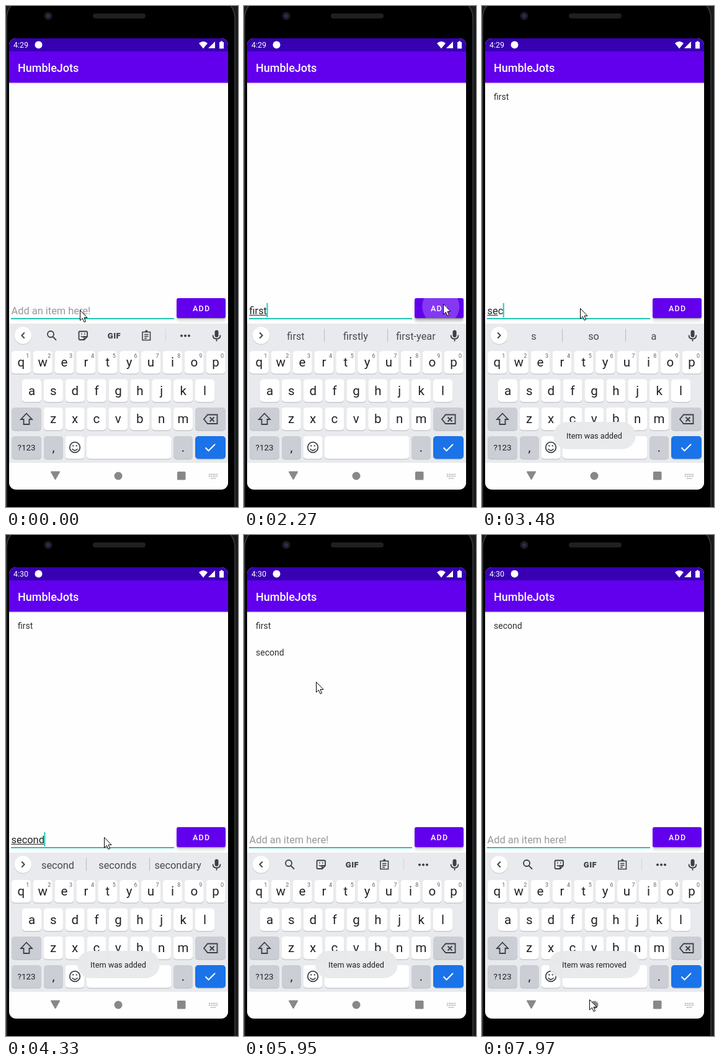
These frames come from a looping animation (374 px wide and 806 px high, 8 s). An HTML page:

```html
<!DOCTYPE html>
<html lang="en">
<head>
<meta charset="utf-8">
<title>To-do list on a phone</title>
<style>
  html, body { margin: 0; width: 100%; height: 100%; overflow: hidden; background: #000; }
  svg { display: block; width: 374px; height: 806px; }
  text { font-family: Roboto, sans-serif; white-space: pre; }
  .mid { text-anchor: middle; }
  .line { fill: none; stroke: #3c4043; stroke-width: 1.8; }
</style>
</head>
<body>
<svg viewBox="0 0 374 806">
  <defs>
    <clipPath id="screen"><rect x="5" y="52" width="353" height="726" rx="11"/></clipPath>
    <clipPath id="face"><rect x="275" y="470" width="79" height="32" rx="3"/></clipPath>
    <filter id="soft" x="-20%" y="-40%" width="140%" height="200%"><feGaussianBlur stdDeviation="2"/></filter>
  </defs>

  <!-- phone body -->
  <rect width="374" height="806" fill="#191a1c"/>
  <rect x="1" y="-14" width="368" height="900" rx="34" stroke="#3b3d40" stroke-width="1.5"/>
  <circle cx="68" cy="16" r="6.5" fill="#1b1b22"/>
  <circle cx="68" cy="16" r="3" fill="#2c2c55"/>
  <rect x="140" y="12" width="85" height="8" rx="4" fill="#202020"/>

  <g clip-path="url(#screen)">
    <rect x="5" y="52" width="353" height="726" fill="#fefefe"/>
    <rect x="5" y="123" width="353" height="2" fill="#000" opacity=".1"/>
    <rect x="5" y="73" width="353" height="50.5" fill="#6200ee"/>
    <rect x="5" y="52" width="353" height="21" fill="#3700b3"/>

    <!-- status bar -->
    <g fill="#fff">
      <text id="clock" x="12" y="67" font-size="12.5"></text>
      <circle cx="52.5" cy="62.5" r="6"/>
      <path d="M311 60Q318 54 325 60L318 68.5Z M326 68L337 57V68Z M344 58h2v-1.500h3v1.500h2v10.500h-7z"/>
      <text x="19" y="106" font-size="18" font-weight="500">HumbleJots</text>
    </g>

    <!-- list -->
    <g font-size="14" fill="#303030">
      <text id="first" x="19" y="151">first</text>
      <text id="second" x="19">second</text>
    </g>

    <!-- input row -->
    <text id="hint" x="8.500" y="496" font-size="16.4" fill="#999">Add an item here!</text>
    <text id="typed" x="8.500" y="496" font-size="16.4" fill="#222"></text>
    <rect id="under" x="8.500" y="497" height="1" fill="#222"/>
    <rect id="caret" y="478" width="2" height="23" fill="#14cdbb"/>
    <rect x="8" y="502" width="263" height="2" fill="#1fc4b4"/>
    <rect id="lift" x="275" y="474" width="79" height="33" rx="4" filter="url(#soft)"/>
    <rect x="275" y="471.500" width="79" height="32" rx="3" opacity=".25"/>
    <rect x="275" y="470" width="79" height="32" rx="3" fill="#6200ee"/>
    <g clip-path="url(#face)"><circle id="ripple" fill="#fff"/></g>
    <text x="301" y="491" font-size="12.5" font-weight="500" letter-spacing="1.3" fill="#fff">ADD</text>

    <!-- keyboard -->
    <rect x="5" y="511" width="353" height="224" fill="#e8eaed"/>
    <circle cx="27.500" cy="531" r="14" opacity=".12"/>
    <circle cx="27.500" cy="530" r="13.700" fill="#fff"/>
    <path id="chevron" class="line" d="M2.300-4.500L-2.200 0L2.300 4.500"/>
    <g id="tools" class="line">
      <circle cx="72" cy="528" r="5"/>
      <path d="M75.500 532L81 537.500"/>
      <path d="M119 523.500h10.500q1.500 0 1.500 1.500v7l-5 5h-7q-1.500 0-1.500-1.500v-10.500q0-1.500 1.500-1.500z M126 537v-4q0-1 1-1h4 M121 531q2.500 3 5 0 M121 527.500h1.500 M126 527.500h1.500"/>
      <path d="M220 524.500h12.500v13h-12.500z M223 528.500h6.500 M223 531.500h6.500 M223 534.500h4 M223.500 524h5.500" stroke-width="1.600"/>
      <path d="M226.300 521.500v2.500" stroke-width="3"/>
      <path d="M257.500 520v20" stroke="#d0d3d8" stroke-width="1"/>
      <g fill="#3c4043" stroke="none">
        <circle cx="283" cy="530.500" r="2"/><circle cx="289" cy="530.500" r="2"/><circle cx="295" cy="530.500" r="2"/>
        <text class="mid" x="174.500" y="535" font-size="13" font-weight="900" letter-spacing=".5">GIF</text>
      </g>
    </g>
    <g id="words" font-size="16.3" fill="#474a4e">
      <path d="M129.500 519.500v21 M231.500 519.500v21" stroke="#b6b9be"/>
      <text class="mid" x="83.500" y="537"></text>
      <text class="mid" x="180" y="537"></text>
      <text class="mid" x="277" y="537"></text>
    </g>
    <rect x="336.500" y="521.500" width="6" height="11.500" rx="3" fill="#3c4043"/>
    <path class="line" d="M333.500 529.500q0 6 6 6t6-6 M339.500 535.500v4"/>

    <g id="keys"></g>
    <g class="line">
      <path d="M33 655.500L42 665h-4.500v8h-9v-8H24z"/>
      <path d="M325 657.500h15.500v14.500H325L319 664.800z M328.500 661.500l7 7 M335.500 661.500l-7 7"/>
      <circle cx="111" cy="710" r="8.300"/>
      <path d="M106.500 712.500q4.500 5 9 0 M107.200 707.500h2.200 M112.600 707.500h2.200"/>
      <path d="M321.500 710.500l5 5l10.500-10.500" stroke="#fff" stroke-width="2"/>
    </g>

    <!-- navigation -->
    <g fill="#888">
      <path d="M73 749.500h13L79.500 761z" stroke="#888" stroke-width="2" stroke-linejoin="round"/>
      <circle cx="181" cy="756" r="6.500"/>
      <rect x="276" y="749" width="13.500" height="13.500" rx="1.500"/>
      <path d="M327 753.500h14 M327 756.500h14 M330 760h8" stroke="#999" stroke-width="1.600" stroke-dasharray="1.700 1.300"/>
    </g>

    <g id="toast">
      <rect y="669" height="44" rx="22" fill="#e9eaeb" opacity=".96"/>
      <text class="mid" x="181" y="696" font-size="12.700" fill="#222"></text>
    </g>
  </g>

  <path id="mouse" d="M0 0V16.500L3.800 13L6.500 19L9 18L6.500 12H11.500Z" fill="#fff" stroke="#000"/>
</svg>

<script>
const $ = id => document.getElementById(id);
const set = (el, attrs) => { for (const k in attrs) el.setAttribute(k, attrs[k]); return el; };

function add(tag, attrs, label = '') {
  const el = set(document.createElementNS('http://www.w3.org/2000/svg', tag), attrs);
  el.textContent = label;
  $('keys').append(el);
}

function key(x, y, w, fill = '#fff') {
  add('rect', { x, y: y + 1.2, width: w, height: 36.5, rx: 5, fill: '#bfc2c7' });
  add('rect', { x, y, width: w, height: 36.5, rx: 5, fill });
}

function label(x, y, size, s, fill = '#202124') {
  add('text', { x, y, 'font-size': size, fill, class: 'mid' }, s);
}

[['qwertyuiop', 24.3, 555], ['asdfghjkl', 41.5, 600.5], ['zxcvbnm', 76.2, 646]].forEach(([row, x0, y], r) => {
  [...row].forEach((c, i) => {
    const x = x0 + i * 34.87;
    key(x - 15.5, y, 31);
    label(x, y + 25, 20.5, c);
    if (!r) label(x + 10.5, y + 11, 9, (i + 1) % 10, '#5f6368');
  });
});
const grey = '#cbced4';
key(9, 646, 48, grey);
key(305, 646, 49, grey);
key(9, 692, 48, grey);
key(61, 692, 31, grey);
key(95.5, 692, 31);
key(130, 692, 136.5);
key(270, 692, 31, grey);
key(305, 692, 49, '#1a73e8');
label(33, 715, 13.4, '?123');
label(76.5, 717, 20, ',');
label(285.5, 717, 20, '.');

// The screen refreshes only at these moments.
const ticks = [0, 280, 560, 840, 960, 1080, 1200, 1350, 1720, 1850, 2000, 2120, 2270, 2390, 2540, 2660,
  2780, 2930, 3330, 3480, 3630, 3750, 3900, 4180, 4320, 4440, 4590, 4710, 4860, 4990, 5140, 5290, 5420,
  5550, 5680, 5830, 5950, 6070, 6190, 6310, 6460, 6580, 6730, 7010, 7150, 7280, 7430, 7560, 7700, 7840, 7970];

// [time, text, underlined letters if not all]
const typing = [[-720, ''], [560, 'f'], [840, 'fi'], [960, 'fir'], [1080, 'firs'], [1200, 'first'], [2390, ''],
  [3330, 's'], [3480, 'sec', 2], [3630, 'seco'], [3750, 'secon'], [3900, 'second'], [5420, '']];
const hints = [[0, ''], [840, 'f for from'], [960, 'fi find fit'], [1080, 'fir first fire'],
  [1200, 'firs first fits'], [1350, 'first firstly first-year'], [2390, ''], [3480, 's so a'],
  [3630, 'sec second secret'], [3750, 'seco second seconds'], [3900, 'secon second seconds'],
  [4180, 'second seconds secondary'], [5420, '']];
const path = [[0, 119, 489], [1650, 119, 489], [2000, 353, 480], [2120, 330, 479], [2270, 321, 479],
  [2390, 321, 479], [2660, 212, 488], [2780, 172, 487], [2930, 158, 486], [4590, 158, 486], [4990, 288, 485],
  [5140, 301, 485], [5420, 301, 485], [5950, 116, 236], [6310, 80, 150], [6730, 38, 145],
  [7150, 38, 145], [7840, 165, 705], [7970, 173, 747], [8000, 173, 747]];
const presses = [[2180, 321, 479], [5240, 301, 485]];
const toasts = [[2600, 4600, 'added'], [5550, 7500, 'added'], [7720, 9000, 'removed']];

const latest = (rows, t) => rows.filter(r => r[0] <= t).pop();
const ramp = (t, a, b) => Math.min(1, Math.max(0, (t - a) / (b - a)));
const mix = (a, b, k) => a + (b - a) * k;

function drawInput(t) {
  const [start, s, n = s.length] = latest(typing, t);
  const typed = $('typed');
  typed.textContent = s;
  set($('hint'), { opacity: s ? 0 : 1 });
  set($('under'), { width: n ? typed.getSubStringLength(0, n) : 0 });
  set($('caret'), {
    x: 8.5 + (s ? typed.getComputedTextLength() - .5 : 0),
    opacity: (t - start) % 1000 < 500 ? 1 : 0
  });

  const words = latest(hints, t)[1];
  set($('tools'), { visibility: words ? 'hidden' : 'visible' });
  set($('words'), { visibility: words ? 'visible' : 'hidden' });
  set($('chevron'), { transform: `translate(27.5 530) scale(${words ? -1 : 1} 1)` });
  const list = words.split(' ');
  $('words').querySelectorAll('text').forEach((el, i) => el.textContent = list[i] || '');
}

function drawButton(t) {
  const [start, x, y] = latest(presses, t) || [-999, 0, 0];
  const k = Math.sqrt(ramp(t, start, start + 230));
  const fade = 1 - ramp(t, start + 200, start + 400);
  set($('ripple'), { cx: mix(x, 315, k), cy: mix(y, 486, k), r: 48 * k, opacity: .22 * fade });
  set($('lift'), { opacity: .12 + .2 * k * fade });
}

function drawToast(t) {
  const [start, end, word] = latest(toasts, t) || [0, 0, ''];
  const [box, text] = $('toast').children;
  text.textContent = 'Item was ' + word;
  const w = text.getComputedTextLength() + 43;
  set(box, { x: 181.3 - w / 2, width: w });
  set($('toast'), { opacity: ramp(t, start, start + 150) * (1 - ramp(t, end, end + 150)) });
}

function draw(t) {
  $('clock').textContent = t < 4180 ? '4:29' : '4:30';
  set($('first'), { opacity: ramp(t, 2450, 2570) * (1 - ramp(t, 6950, 7070)) });
  set($('second'), { opacity: ramp(t, 5480, 5600), y: mix(194, 151, ramp(t, 7070, 7320)) });
  drawInput(t);
  drawButton(t);
  drawToast(t);

  const i = path.findIndex(p => p[0] > t);
  const [a, b] = [path[i - 1], path[i]];
  const k = ramp(t, a[0], b[0]);
  set($('mouse'), { transform: `translate(${Math.round(mix(a[1], b[1], k)) + .5} ${Math.round(mix(a[2], b[2], k)) + .5})` });
}

let origin;
function frame(now) {
  origin ??= now;
  const t = (now - origin) % 8000;
  draw(ticks.filter(k => k <= t).pop());
  requestAnimationFrame(frame);
}
draw(0);
requestAnimationFrame(frame);
</script>
</body>
</html>
```
